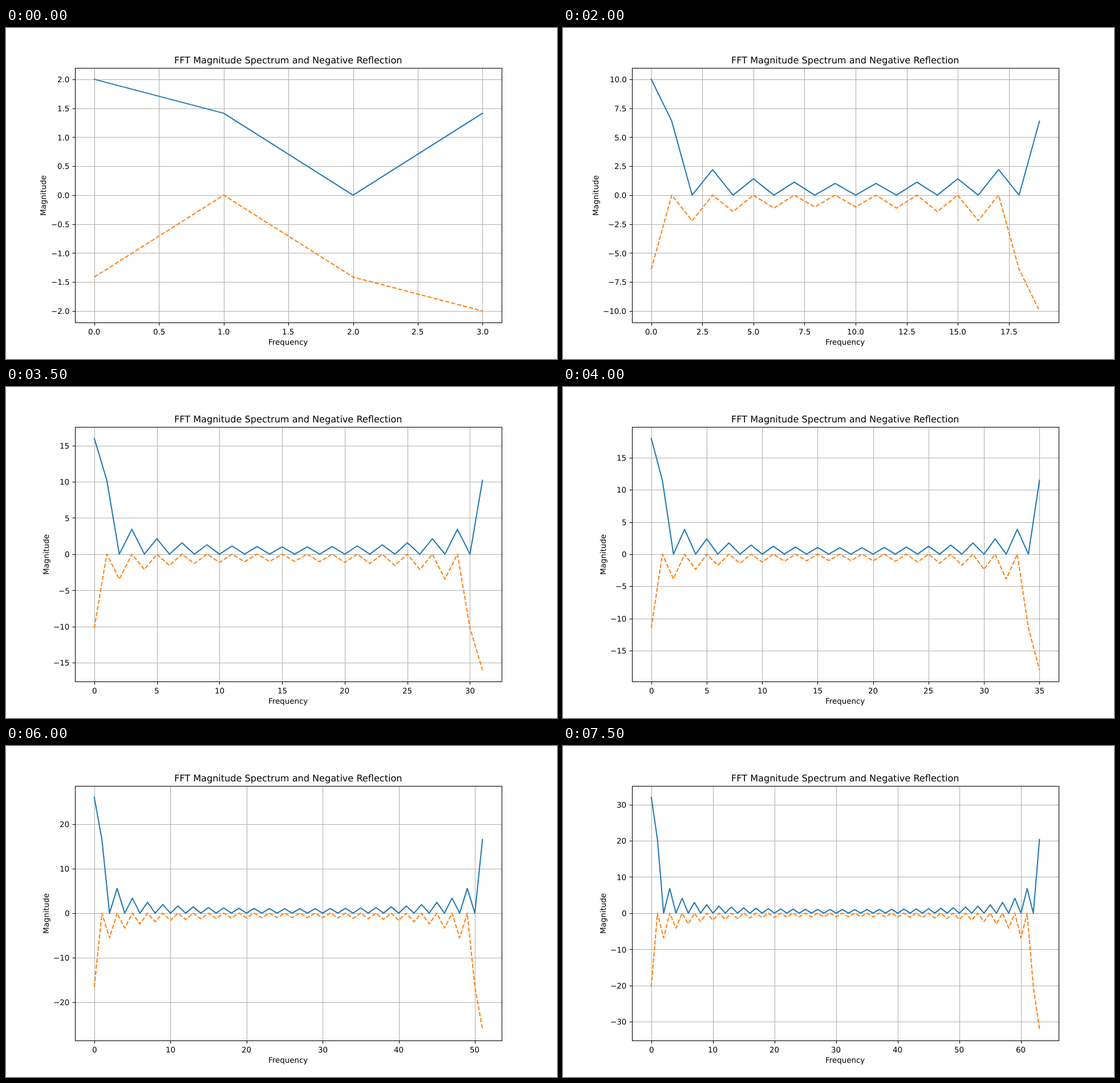
Animation, 966 px wide and 580 px high, one loop 8000 ms. Source, as an HTML page with a canvas:

```html
<!DOCTYPE html>
<html lang="en">
<head>
<meta charset="utf-8">
<title>FFT Magnitude Spectrum</title>
<style>
  html, body { margin: 0; width: 966px; height: 580px; overflow: hidden; background: #fff; }
  canvas { display: block; }
</style>
</head>
<body>
<canvas id="c" width="966" height="580"></canvas>
<script>
const ctx = document.getElementById('c').getContext('2d');
const W = 966, H = 580, PT = W / 720;
const STEP = 500, STEPS = 16;
const FAMILY = '"DejaVu Sans", Verdana, sans-serif';

// Plot area and its 5% data margins
const L = W * 0.125, R = W * 0.9, T = H * 0.12, B = H * 0.89;
const padX = (R - L) / 22, padY = (B - T) / 22;
const midX = (L + R) / 2, midY = (T + B) / 2;

const snap = v => Math.round(v) + 0.5;

function setFont(pt) {
  ctx.font = `${pt * PT}px ${FAMILY}`;
  ctx.textRendering = 'geometricPrecision';
  ctx.fillStyle = '#000';
}

function centered(text, x, y) {
  ctx.fillText(text, Math.round(x - ctx.measureText(text).width / 2), y);
}

function line(x1, y1, x2, y2) {
  ctx.beginPath();
  ctx.moveTo(x1, y1);
  ctx.lineTo(x2, y2);
  ctx.stroke();
}

// Smallest round step giving at most nine intervals
function tickStep(range) {
  const raw = range / 9;
  const p = 10 ** Math.floor(Math.log10(raw));
  return [1, 2, 2.5, 5, 10].find(s => s * p >= raw) * p;
}

function ticks(lo, hi, range) {
  const step = tickStep(range);
  const digits = Number.isInteger(step) ? 0 : 1;
  const list = [];
  for (let i = Math.ceil(lo / step); i * step <= hi; i++) {
    const v = i * step;
    list.push({ v, label: (v < 0 ? '\u2212' : '') + Math.abs(v).toFixed(digits) });
  }
  return list;
}

// DFT magnitude of n/2 ones followed by n/2 zeros
function magnitude(k, n) {
  if (k === 0) return n / 2;
  return k % 2 ? 1 / Math.sin(Math.PI * k / n) : 0;
}

function plot(n, fn, px, py, color, dash, cap) {
  ctx.strokeStyle = color;
  ctx.lineWidth = 1.5 * PT;
  ctx.lineJoin = 'round';
  ctx.lineCap = cap;
  ctx.setLineDash(dash.map(d => d * 1.5 * PT));
  ctx.beginPath();
  for (let k = 0; k < n; k++) ctx.lineTo(px(k), py(fn(k)));
  ctx.stroke();
  ctx.setLineDash([]);
  ctx.lineCap = 'butt';
}

function draw(n) {
  const last = n - 1, peak = n / 2;
  const px = v => L + padX + v / last * (R - L - 2 * padX);
  const py = v => midY - v / peak * (midY - T - padY);
  const xt = ticks(0, last * 1.05, last * 1.1);
  const yt = ticks(-peak * 1.1, peak * 1.1, peak * 2.2);
  const left = snap(L), right = snap(R), top = snap(T), bottom = snap(B);

  ctx.fillStyle = '#fff';
  ctx.fillRect(0, 0, W, H);

  ctx.lineWidth = 0.8 * PT;
  ctx.strokeStyle = '#b0b0b0';
  for (const { v } of xt) line(snap(px(v)), top, snap(px(v)), bottom);
  for (const { v } of yt) line(left, snap(py(v)), right, snap(py(v)));
  ctx.strokeStyle = '#000';
  for (const { v } of xt) line(snap(px(v)), bottom, snap(px(v)), bottom + 5);
  for (const { v } of yt) line(left - 5, snap(py(v)), left, snap(py(v)));

  plot(n, k => magnitude(k, n), px, py, '#1f77b4', [], 'square');
  plot(n, k => -magnitude(last - k, n), px, py, '#ff7f0e', [3.7, 1.6], 'butt');

  ctx.strokeStyle = '#000';
  ctx.lineWidth = 0.8 * PT;
  ctx.lineJoin = 'miter';
  ctx.strokeRect(left, top, right - left, bottom - top);

  setFont(10);
  for (const { v, label } of xt) centered(label, px(v), 537);
  const labelRight = L - 7 * PT;
  let widest = 0;
  for (const { v, label } of yt) {
    const w = ctx.measureText(label).width;
    widest = Math.max(widest, w);
    ctx.fillText(label, Math.round(labelRight - w), Math.round(py(v) + 5.2));
  }
  centered('Frequency', midX, 555);

  ctx.save();
  ctx.translate(Math.round(labelRight - widest - 4 * PT - 3), Math.round(midY));
  ctx.rotate(-Math.PI / 2);
  centered('Magnitude', 0, 0);
  ctx.restore();

  setFont(12);
  centered('FFT Magnitude Spectrum and Negative Reflection', midX, 62);
}

const start = performance.now();
function frame() {
  const t = performance.now() - start;
  draw(4 * (Math.floor(t / STEP) % STEPS + 1));
  requestAnimationFrame(frame);
}
frame();
</script>
</body>
</html>
```
